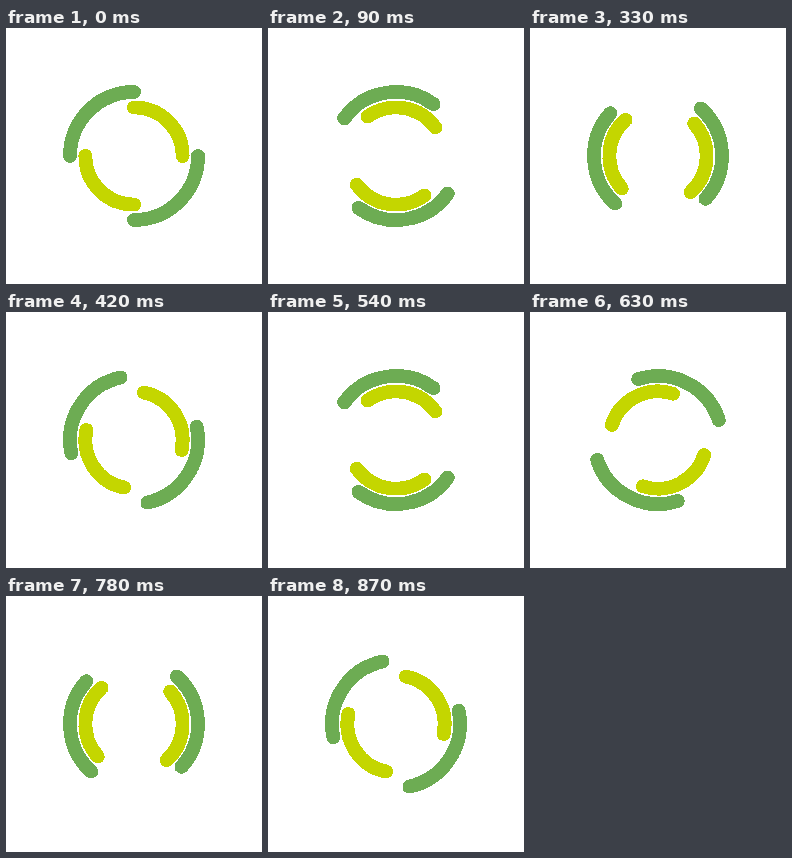
These frames come from a looping animation (256x256 px, 0.9 s). An HTML page with a canvas:

```html
<!DOCTYPE html>
<html lang="en">
<head>
<meta charset="utf-8">
<title>Double ring spinner</title>
<style>
  html, body { margin: 0; width: 100%; height: 100%; overflow: hidden; background: #fff; }
  canvas { display: block; width: 256px; height: 256px; }
</style>
</head>
<body>
<canvas id="stage" width="256" height="256"></canvas>
<script>
const ctx = document.getElementById('stage').getContext('2d', { willReadFrequently: true });
const SIZE = 256;
const CENTER = SIZE / 2;
const LOOP = 900;
const STEP = 30;
const UNIT = SIZE / 100;
const QUARTER = Math.PI / 2;

// Radius in percent of the stage; dir is the sense of rotation.
const outer = { radius: 25, rgb: [109, 172, 83], dir: 1 };
const inner = { radius: 19, rgb: [196, 214, 0], dir: -1 };
const BORDER = (outer.radius + inner.radius) / 2 * UNIT;

function drawRing({ radius, dir }, turn) {
  const base = (dir > 0 ? 0 : QUARTER) + dir * turn;
  for (const start of [base, base + Math.PI]) {
    ctx.beginPath();
    ctx.arc(CENTER, CENTER, radius * UNIT, start, start + QUARTER);
    ctx.stroke();
  }
}

// Hard edges: every pixel touched by a ring takes its full colour.
function hardenEdges() {
  const image = ctx.getImageData(0, 0, SIZE, SIZE);
  const { data } = image;
  for (let i = 0; i < data.length; i += 4) {
    if (data[i + 3] === 0) continue;
    const x = (i / 4) % SIZE + 0.5 - CENTER;
    const y = Math.floor(i / 4 / SIZE) + 0.5 - CENTER;
    const ring = Math.hypot(x, y) > BORDER ? outer : inner;
    data.set([...ring.rgb, 255], i);
  }
  ctx.putImageData(image, 0, 0);
}

function render(step) {
  const turn = step * STEP / LOOP * 2 * Math.PI;
  ctx.clearRect(0, 0, SIZE, SIZE);
  ctx.lineWidth = 5 * UNIT;
  ctx.lineCap = 'round';
  drawRing(outer, turn);
  drawRing(inner, turn);
  hardenEdges();
}

const origin = performance.now();
let shown = -1;
function tick() {
  const step = Math.floor((performance.now() - origin) % LOOP / STEP);
  if (step !== shown) render(shown = step);
  requestAnimationFrame(tick);
}
tick();
</script>
</body>
</html>
```
